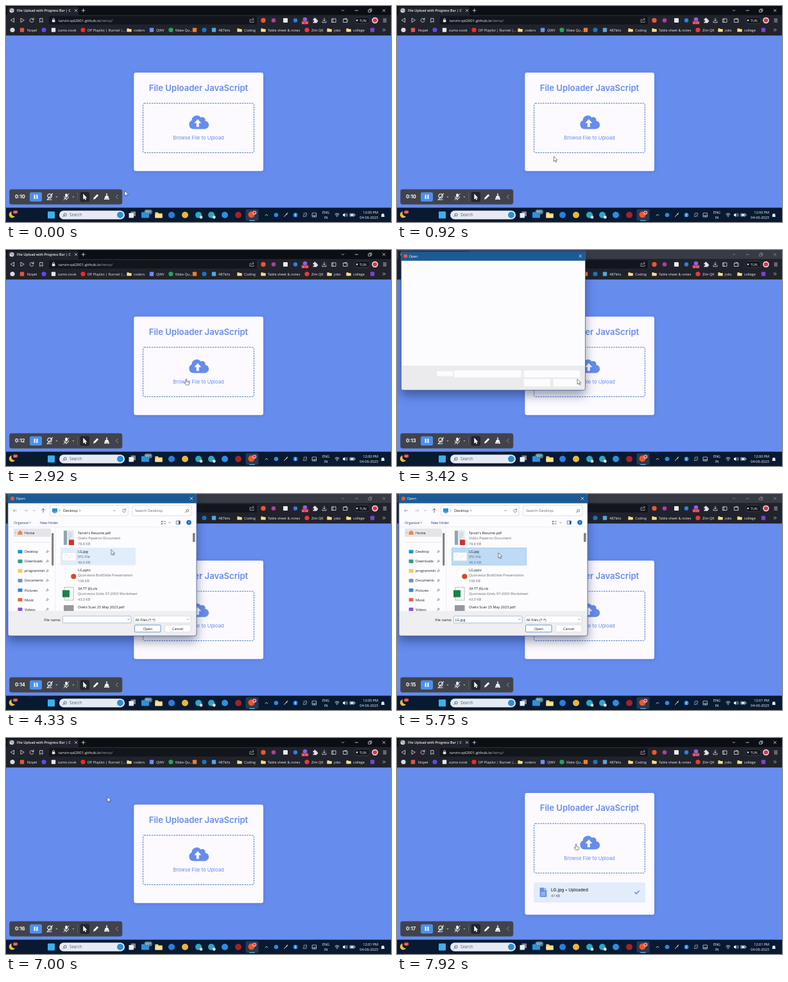
Write an HTML page that moves like this. It is 600 px wide and 338 px high and loops after 8000 ms.

```html
<!DOCTYPE html>
<html lang="en">
<head>
<meta charset="utf-8">
<title>File uploader</title>
<style>
  html, body { margin: 0; width: 100%; height: 100%; overflow: hidden; background: #668cee; }
  svg { display: block; width: 100vw; height: 100vh; font-family: "Open Sans", "Noto Sans", sans-serif; }
  .page text { font-family: Inter, sans-serif; }
  .dialog { filter: drop-shadow(0 8px 8px rgba(10, 22, 60, .42)); }
  .card { filter: drop-shadow(0 1px 3px rgba(40, 60, 140, .22)); }
</style>
</head>
<body>
<svg id="stage" viewBox="0 0 600 338" preserveAspectRatio="none"></svg>
<script>
const LOOP = 8000, STEP = 1000 / 12;
const BLUE = '#668cee', INK = '#1a1a1e', GREY = '#66666e', LIGHT = '#e4e5ea';

// Markup helpers
const rect = (x, y, w, h, fill, r = 0, more = '') =>
  `<rect x="${x}" y="${y}" width="${w}" height="${h}" rx="${r}" fill="${fill}" ${more}/>`;
const dot = (x, y, r, fill, more = '') => `<circle cx="${x}" cy="${y}" r="${r}" fill="${fill}" ${more}/>`;
const text = (x, y, s, size, fill, more = '') =>
  `<text x="${x}" y="${y}" font-size="${size}" fill="${fill}" ${more}>${s.replace(/&/g, '&amp;')}</text>`;
const line = (d, color = LIGHT, w = .8, more = '') =>
  `<path d="${d}" fill="none" stroke="${color}" stroke-width="${w}" stroke-linecap="round" stroke-linejoin="round" ${more}/>`;
const shape = (d, fill, more = '') => `<path d="${d}" fill="${fill}" ${more}/>`;
const group = (x, y, body, more = '') => `<g transform="translate(${x} ${y})" ${more}>${body}</g>`;
const MID = 'text-anchor="middle"', END = 'text-anchor="end"', BOLD = 'font-weight="600"';
const folder = (x, y, k = 1) =>
  `<g transform="translate(${x} ${y}) scale(${k})">${shape('M-3.5-2.6h2.6l1 1h3.4v4.4h-7z', '#f6cf68')}${rect(-3.5, -.8, 7, 3.6, '#ffdf8b', .4)}</g>`;
const chevron = (x, y, color, s = 1.4) => line(`M${x - s} ${y - s / 2}l${s} ${s} ${s}-${s}`, color, .7);
const cross = (x, y, s, color) => line(`M${x - s} ${y - s}l${2 * s} ${2 * s}m0-${2 * s}l-${2 * s} ${2 * s}`, color, .7);

function tabStrip() {
  return `<rect id="strip" width="600" height="15"/>` + rect(2, 1.5, 111, 14, '#20232c', 2.5) +
    dot(9, 7, 3.6, '#d7d9df') + line('M6 6l2.5.5 1 2 2-1.5M8 4.5l2 1', '#5b6069', .8) +
    text(17, 9, 'File Upload with Progress Bar | C', 5.3, '#f1f1f4', BOLD) +
    cross(109, 7, 1.7, LIGHT) + line('M118 7h5m-2.5-2.5v5', LIGHT) +
    `<g id="winButtons">${chevron(525, 7, LIGHT, 1.8)}${line('M544 7h4.5')}` +
    line('M565 6h3.5v3.5h-3.5zM566.4 6v-1.3h3.5v3.5h-1.3', LIGHT, .7) + cross(589, 7, 2, LIGHT) + '</g>';
}

function toolbar() {
  return rect(0, 14, 600, 32.2, '#20232c') + rect(67, 16, 324, 13, '#13151c', 2) +
    line('M12.5 19.5v6l-5-3zM23 19.5v6l5-3z') +
    line('M42.8 21a3 3 0 1 0 .2 2.4M43 18.8v2.5h-2.5M53 19.5h4v6l-2-1.6-2 1.6z') +
    rect(71.8, 21.5, 4.6, 3.8, LIGHT, .5) + line('M72.8 21.5v-1a1.3 1.3 0 0 1 2.6 0v1') +
    `<text x="82" y="24.8" font-size="6" fill="#f4f4f6">tarvin-qd2001.github.io<tspan fill="#9a9da6">/temp/</tspan></text>` +
    line('M382 21h-2v4.5h6v-2M382 23.5q.5-3 4-3m-1.5-1.5l1.7 1.5-1.7 1.6', '#b5b7be', .7) +
    dot(401, 22.5, 3.7, '#f0562b') + rect(392.2, 18, .5, 9, '#3b3e48') + dot(417, 22.5, 3.3, '#b23f9c') +
    rect(432, 19, 7, 7, '#e9edf2', 1) + dot(451, 22.5, 3.2, '#2f7fe4') + dot(466, 21, 3.3, '#8b63d8') +
    rect(460.5, 23.5, 11, 5, '#e02c45', 1) + `<text id="badge" x="466" y="27.6" font-size="4.2" fill="#fff" ${MID}></text>` +
    shape('M478.5 20.3h1.7a1.3 1.3 0 1 1 2.4 0h1.9v2.2a1.2 1.2 0 1 1 0 2.2v1.8h-6v-2a1.2 1.2 0 1 0 0-2z', LIGHT) +
    line('M496 19v4.5m-1.8-1.7l1.8 1.8 1.8-1.8M493 24v1.8h6V24') +
    line('M508 20h6v5.5h-6zM509.4 20v5.5M526 20.5h6v5h-6zM526 20.5l4.5-1v1M530.5 23h.5') +
    rect(543, 17.5, 24, 10, '#14161d', 5, 'stroke="#4a4d57" stroke-width=".6"') + dot(547, 22.5, 1.3, LIGHT) +
    text(551, 24.5, 'TUN', 5.3, '#eee') +
    dot(575, 22.5, 4.8, '#f3e4e5') + dot(575, 22.5, 3.3, '#d6344d') + line('M588 20.3h4.6m-4.6 2.3h4.6m-4.6 2.3h4.6');
}

function bookmarks() {
  const y = 37.5;
  const sites = [
    [10, '#d9dade', ''], [25, '#e05548', 'Nopel', 33], [59, '#5a49ef', ''], [74, '#e7e7ec', 'zumo.nook', 81],
    [120, '#f12a2a', 'DP Playlist | Runnel |...', 127], [227, '#6a8ff2', 'QWV', 234],
    [257, '#27a35a', 'Mate Qu...', 264], [294, '#ee7f2a', ''], [309, '#1f73b9', ''],
    [324, '#58a5dc', '487kits', 331], [469, '#e63b3b', 'Zim QK', 476], [571, '#7a45cf', '']
  ];
  const dirs = [[192, 'coders'], [364, 'Coding'], [401, 'Table sheet & notes'], [504, 'jobs'], [534, 'college']];
  return sites.map(([x, c, s, tx], i) =>
    (i % 2 ? rect(x - 3.2, y - 3.2, 6.4, 6.4, c, 1) : dot(x, y, 3.6, c)) + (s && text(tx, y + 2, s, 5.5, '#f0f0f3'))).join('') +
    dirs.map(([x, s]) => folder(x, y) + text(x + 7, y + 2, s, 5.5, '#f0f0f3')).join('') +
    line('M587.3 35.8l1.6 1.7-1.6 1.7m2.2-3.4l1.6 1.7-1.6 1.7', LIGHT, .7);
}

function page() {
  const form = text(300, 132.6, 'File Uploader JavaScript', 13.1, BLUE, `${MID} ${BOLD}`) +
    rect(213.6, 152.2, 172.8, 77.4, 'none', 2, 'stroke="#4173bd" stroke-width="1" stroke-dasharray="2.4 1.4"') +
    group(285, 170.5, shape('M7 22a7 7 0 0 1-2.4-13.4A7.6 7.6 0 0 1 18.4 4a4.7 4.7 0 0 1 7 5.2A6.2 6.2 0 0 1 24 22z', BLUE) +
      shape('M13.8 6.5l5.5 6.2h-3.5v6h-4v-6H8.3z', '#fcfaff')) +
    text(300, 208.9, 'Browse File to Upload', 7.7, BLUE, MID);
  const row = rect(213, 226, 174, 31.5, '#e3ecfa', 2) +
    shape('M222.6 234.3h6.4v4h4.2v10.4h-10.6zM229.8 234.3l3.4 3.3h-3.4z', BLUE) +
    line('M225 241.5h5.8m-5.8 2.2h5.8m-5.8 2.2h5.8', '#e3ecfa', .8) +
    text(240, 240.4, 'LG.jpg • Uploaded', 6.6, '#26282e', 'font-weight="500"') +
    text(240, 248.5, '47 KB', 5, '#4a4d55') + line('M370.8 241.6l2.2 2.2 4-4.4', BLUE, 1.6);
  return rect(0, 46, 600, 270, BLUE) +
    `<g class="page"><rect id="card" class="card" x="199.3" width="201.7" rx="3" fill="#fcfaff"/>` +
    `<g id="form">${form}</g><g id="row">${row}</g></g>`;
}

function dialog() {
  const head = rect(3, 0, 294, 14.5, '#1d5a94') + dot(10, 7, 3.1, '#f0562b') +
    text(15.5, 9.2, 'Open', 5.6, '#fff') + cross(289, 7, 2, '#fff');
  const field = (x, y, w, h, stroke = '#d3d2d8') => rect(x, y, w, h, '#fff', 1, `stroke="${stroke}" stroke-width=".7"`);
  const nav = line('M16.5 26h-5m2-2l-2 2 2 2', '#8d8d95') + line('M28.5 26h5m-2-2l2 2-2 2', '#b4b4bb') +
    chevron(44, 26, '#8d8d95') + line('M58 29v-6m-2.3 2.3l2.3-2.3 2.3 2.3', '#4b4b53') +
    field(68.5, 18, 121.5, 16) + rect(72, 22.5, 8, 6, '#2292d4', .6) + rect(73.5, 29, 5, .8, '#16669d') +
    line('M83 24.5l1.5 1.5-1.5 1.5M114.5 24.5l1.5 1.5-1.5 1.5', '#55555c', .6) + text(89, 28, 'Desktop', 5.9, INK) +
    chevron(169, 26, '#55555c') + line('M186.3 24.6a2.5 2.5 0 1 0 .3 2.2m0-3.6v1.8h-1.8', '#55555c', .7) +
    field(197, 18, 92, 16) + text(201, 28, 'Search Desktop', 5.9, GREY) +
    line('M281.2 27.2l-1.9 2m1.6-3.2a1.9 1.9 0 1 0 3.8 0 1.9 1.9 0 1 0-3.8 0', '#55555c', .7) +
    text(12, 46.6, 'Organize', 5.5, '#24406e') + chevron(37.5, 44.8, '#24406e', 1.1) + text(53, 46.6, 'New folder', 5.5, '#24406e') +
    rect(242, 42, 2.2, 2, '#5b7fa8') + rect(242, 45.5, 2.2, 2, '#5b7fa8') + line('M246 43h2.6m-2.6 3.5h2.6', '#5b5b64', .7) +
    chevron(255, 44.8, '#55555c', 1.1) + rect(265.3, 42, 6, 5.2, '#fff', .4, 'stroke="#27548d" stroke-width=".7"') +
    rect(269, 42, 2.3, 5.2, '#27548d') + dot(285, 44.6, 3.8, '#176ec1') + text(285, 46.6, '?', 5.5, '#fff', `${MID} ${BOLD}`) +
    rect(3, 51.2, 294, .6, '#e3e2e7');
  const places = [['Desktop', '#2292d4'], ['Downloads', '#2f9c82'], ['programmin', '#f5cb5c'], ['Documents', '#6d91b4'],
    ['Pictures', '#2f86dc'], ['Music', '#dd6a4b'], ['Videos', '#8757c9']];
  const side = rect(12, 54, 58, 13, '#e5e4e9', 1) + shape('M22 56.8l3.6 3.2v3.8h-7.2V60z', '#e58a4a') + text(29, 62.6, 'Home', 5.5, INK) +
    line('M14.5 59.5l1.3 1.2-1.3 1.2', '#66666d', .5) + rect(14, 75.5, 55, .6, '#d9d8de') +
    places.map(([s, c], i) => {
      const y = 90.3 + i * 15.05;
      return rect(18.5, y - 2.8, 7, 5.6, c, 1) + text(29, y + 2, s, 5.4, INK) +
        line(`M64.5 ${y - 2}l2.2 1.8-1 .3-1 1.2-1.6-1.7 1.3-.7zm-.6 2.5l-1.3 1.3`, '#66666d', .6);
    }).join('') + rect(71.2, 61, 3, 51, '#7c7c82', 1.2) + rect(76.6, 52, .5, 131, '#e2e1e6');
  const files = [["Tarvin's Resume.pdf", 'Ovelo Paperon Document', '78.8 KB'], ['LG.jpg', 'JPG File', '46.6 KB'],
    ['LG.pptx', 'Quorvexia BoldSlide Presentation', '108 KB'], ['3A TT (6).xls', 'Quorvexia Grids 97-2003 Worksheet', '43.0 KB'],
    ['Ovelo Scan 25 May 2023.pdf', '', '']];
  const list = '<rect id="hover" x="85" width="117" height="27.4" fill="#e0edfb"/>' +
    '<rect id="picked" x="85.3" y="84.2" width="116.4" height="27" fill="#bedbf5" stroke="#93c2ea" stroke-width=".6"/>' +
    files.map((f, i) => f.map((s, k) => text(112, 62.5 + i * 29 + k * 8.7, s, 5.5, k ? GREY : INK)).join('')).join('') +
    rect(90, 57.5, 15, 22, '#e9edf0', 0, 'stroke="#cacdd3" stroke-width=".4"') + rect(90, 57.5, 5, 22, '#8fa5b5') +
    line('M97 61h6m-6 3h6m-6 3h5m-5 3h3', '#a4a8ae', .7) + rect(98, 71.5, 8, 8.5, '#d92d2a', 1) +
    rect(88, 91.5, 21, 13, '#fff', 0, 'stroke="#d5d8de" stroke-width=".5"') + line('M91 95h5m-5 3h3m5-1h6m-8 3h4', '#d1d5df', .6) +
    rect(93, 118, 14, 17, '#fdfdfe', 0, 'stroke="#e8e8ec" stroke-width=".4"') + dot(105.3, 129, 4.1, '#d24b2c') +
    rect(91, 146, 14, 20, '#fff', 0, 'stroke="#88a793" stroke-width=".7"') + rect(88, 150.5, 11, 11, '#18814a') +
    rect(90, 174, 15.5, 9, '#98979b');
  const foot = rect(3, 183, 294, 39, '#efeef1') + text(85.5, 198.5, 'File name:', 5.5, INK, END) +
    field(88.5, 191, 106.5, 10.8, '#8aa9cb') + '<text id="fileName" x="90.5" y="198.5" font-size="5.5" fill="#1a1a1e"></text>' +
    chevron(191, 196.3, '#55555c', 1.1) + field(199.5, 191, 88.5, 10.8) + text(201.5, 198.5, 'All Files (*.*)', 5.5, INK) +
    chevron(283.5, 196.3, '#55555c', 1.1) + field(200.5, 205, 40.5, 11, '#2774bd') + text(221, 212.5, 'Open', 5.5, INK, MID) +
    field(247.5, 205, 40.5, 11) + text(267.5, 212.5, 'Cancel', 5.5, INK, MID);
  const blank = rect(3, 14, 294, 169, '#fcfbfe') + rect(3, 183, 294, 39, '#ebebed') +
    rect(60, 191.5, 25.5, 8, '#fcfbfe') + rect(87.5, 190.5, 107, 11, '#fcfbfe') +
    rect(199, 190.5, 89.5, 11, '#fcfbfe') + rect(199, 204, 42, 12, '#fcfbfe') + rect(246, 204, 42.5, 12, '#fcfbfe');
  return `<clipPath id="listClip">${rect(78, 52, 212, 131, '#000')}</clipPath><clipPath id="frame">${rect(3, 0, 294, 222, '#000', 3)}</clipPath>` +
    `<g id="dialog" class="dialog"><g clip-path="url(#frame)">${rect(3, 0, 294, 222, '#fcfbfe')}${nav}${side}` +
    `<g clip-path="url(#listClip)">${list}</g>${rect(291, 61, 3.6, 14, '#828288', 1)}${foot}<g id="blank">${blank}</g>${head}</g>` +
    rect(3, -2, 294, 224, 'none', 3, 'stroke="#3d5f93" stroke-width=".8"') + '</g>';
}

function recorder() {
  return rect(5.5, 287, 175.5, 23.3, '#40434b', 3, 'stroke="#4b4f58" stroke-width=".6"') +
    `<text id="timer" x="14" y="301" font-size="7.5" font-weight="700" fill="#fff" font-family="Inter, sans-serif"></text>` +
    rect(37, 291.5, 19, 14.5, '#4c8ff0', 2.5) + rect(43.6, 295.3, 2, 6.8, '#fff', .4) + rect(47.4, 295.3, 2, 6.8, '#fff', .4) +
    line('M64.8 297.2a3.2 3.2 0 1 1 6.4 0 3.2 3.2 0 1 1-6.4 0M65 303h6M64 303.5l8.5-10', '#fff', 1.1) +
    shape('M77.3 298h3.2l-1.6 1.8zM103.3 298h3.2l-1.6 1.8z', '#b7bac2') +
    rect(92.3, 293.5, 3.4, 6, '#fff', 1.7) + line('M90.6 298.5a3.4 3.4 0 0 0 6.8 0M94 302v1.7M90 303.5l8-9.5', '#fff', .9) +
    rect(111.3, 292, .6, 13, '#666a74') + rect(115.5, 291, 14.5, 15.5, '#23262d', 2.5) +
    shape('M120.3 293.8v9l2-1.8 1.4 2.8 1.4-.7-1.4-2.7h2.7z', '#fff') +
    shape('M136 302.8l.7-2.7 5.4-5.6 2.1 2-5.5 5.6z', '#fff') +
    line('M157 293.8v3.5', '#fff', 1.4) + shape('M154.7 297.2h4.6l1.7 5.8h-8z', '#fff') + line('M155.8 300.5v2.5m2.3-2.5v2.5', '#3c4049', .6) +
    line('M174.3 295.5l-2.8 3 2.8 3', '#9b9fa8', .9);
}

function taskbar() {
  const apps = [[258, '#2c7de0'], [279, '#e9b63c'], [300, '#2ba6c4'], [320, '#2ba6c4'], [341, '#2d8fe0'], [362, '#a3222b']];
  return rect(0, 315.6, 600, 22.4, '#081a31') +
    shape('M9 321.5a5 5 0 1 0 5 7.5 5 5 0 0 1-5-7.5z', '#f6b93a') + rect(10.8, 319.8, 7.6, 5.4, '#c8392f', 2.7) +
    text(14.8, 324, '34°', 4.2, '#fff', MID) +
    rect(65, 321.5, 11, 11, '#3cb1ee', .8) + rect(83, 320.3, 102, 13.4, '#e6ebf3', 6.7) +
    line('M90.3 328l-1.8 2m1.5-3.3a2.1 2.1 0 1 0 4.2 0 2.1 2.1 0 1 0-4.2 0', '#3d4552', .8) + text(99, 329.2, 'Search', 6.2, '#5a626e') +
    dot(178, 327, 5, '#2b8fd6') + rect(194.5, 321.5, 7.5, 7.5, '#7f8894', .6) + rect(191.5, 324, 7.5, 7.5, '#eceff3', .6) +
    rect(211, 322.5, 12, 9, '#2b93e0', 1) + rect(215.5, 318.5, 12.5, 7.4, '#4b7f96', 3.7) + text(221.8, 324.2, '99+', 5.2, '#fff', MID) +
    folder(238, 327, 1.6) + apps.map(([x, c]) => dot(x, 327, 5, c)).join('') + dot(304, 330.5, 2.4, '#e4ccb9') + dot(324.3, 330.5, 2.4, '#e8e2d4') +
    rect(373.5, 318, 20, 18, '#26394f', 2) + dot(382.5, 326.5, 5, '#f0562b') + dot(387.3, 323.3, 2.9, '#f3e0e2') + dot(387.3, 323.3, 2, '#d6344d') +
    rect(379, 335, 9, 1.2, '#64b8f2', .6) +
    line('M404 328l2-2 2 2') + dot(421, 327, 3.3, '#2b8bdd') + line('M433.5 329.7l4.7-5.5M437 327l1.5-3', LIGHT, .9) +
    dot(451, 327, 3.5, '#1d7be0') + line('M449.6 325.5l2.7 2.7-1.3 1.4v-5.2l1.3 1.4-2.7 2.7', '#fff', .5) +
    line('M463.5 324.5l5 5m-3.5-5.5h3.5v3.5M463.5 327v2.5h3', '#a9b3c0', .8) + line('M477.5 324h6v6h-6zM477.5 328h6m-3 0v2', LIGHT, .7) +
    text(498.5, 325.2, 'ENG', 5.5, '#fff', MID) + text(498.5, 333.2, 'IN', 5.5, '#fff', MID) +
    line('M512.8 325.8a4.6 4.6 0 0 1 6.4 0M514 327.4a3 3 0 0 1 4 0', '#fff', .8) + dot(516, 329.3, .8, '#fff') +
    shape('M525 325.6h1.4l2-1.7v6.2l-2-1.7H525z', '#fff') + line('M529.8 325.5a2 2 0 0 1 0 3M531 324.3a3.6 3.6 0 0 1 0 5.4', '#fff', .6) +
    line('M536.3 325h6.5v4h-6.5zM544 326.3v1.4', '#fff', .7) + rect(537, 325.7, 4.5, 2.6, '#fff') +
    `<text id="clock" x="580" y="325.2" font-size="5.5" fill="#fff" ${END}></text>` + text(580, 333.2, '04-06-2023', 5.5, '#fff', END) +
    shape('M585 329.3v-2.2a2.3 2.3 0 0 1 4.6 0v2.2l.7.8h-6z', LIGHT);
}

const arrow = shape('M0 0v8.2l1.9-1.8 1.3 2.8 1.2-.5-1.3-2.8h2.7z', '#fff', 'stroke="#222" stroke-width=".55"');
const hand = shape('M-.8.6a.8.8 0 0 1 1.6 0v3.2l3 .7q1 .3.8 1.5l-.7 3.2H-.7L-3 5.8q.5-1 1.4-.2l.8.6z', '#fff', 'stroke="#222" stroke-width=".55"');

const stage = document.getElementById('stage');
stage.innerHTML = page() + tabStrip() + toolbar() + bookmarks() + taskbar() + dialog() + recorder() +
  `<g id="pointer"><g id="arrow">${arrow}</g><g id="hand">${hand}</g></g>`;
const el = {};
stage.querySelectorAll('[id]').forEach(n => el[n.id] = n);
const show = (n, on) => n.setAttribute('display', on ? 'inline' : 'none');
const set = (n, name, v) => n.setAttribute(name, v);

const OPENED = 3320, LOADED = 3560, PICKED = 5000, CLOSED = 6900, DONE = 7400, MINUTE = 5000;
const path = [[250, 185, 289], [1400, 281, 202], [3560, 281, 202], [4250, 164, 87], [4500, 164, 87],
  [4900, 158, 92], [7150, 158, 92], [7800, 279, 166]];
const ease = p => p * p * (3 - 2 * p);

function pointerAt(t) {
  const i = path.findIndex(k => k[0] > t);
  if (i === 0) return path[0].slice(1);
  if (i < 0) return path[path.length - 1].slice(1);
  const [t0, x0, y0] = path[i - 1], [t1, x1, y1] = path[i];
  const p = ease((t - t0) / (t1 - t0));
  return [x0 + (x1 - x0) * p, y0 + (y1 - y0) * p];
}

function draw(t) {
  const open = t >= OPENED && t < CLOSED, done = t >= DONE;
  const [x, y] = pointerAt(t);
  const time = '0:' + (10 + Math.max(0, Math.floor((t - 60) / 1000)));
  el.timer.textContent = el.badge.textContent = time;
  el.clock.textContent = t < MINUTE ? '12:00 PM' : '12:01 PM';

  const lift = done ? 18.3 : 0;
  set(el.card, 'y', 104.2 - lift);
  set(el.card, 'height', done ? 190.5 : 154);
  set(el.form, 'transform', `translate(0 ${-lift})`);
  show(el.row, done);

  // The browser window loses focus while the dialog is open
  show(el.dialog, open);
  set(el.strip, 'fill', open ? '#393b44' : '#0c0e15');
  set(el.winButtons, 'opacity', open ? .5 : 1);
  const grow = Math.min(1, .952 + .024 * Math.floor((t - OPENED) / STEP));
  set(el.dialog, 'transform', `translate(150 111) scale(${grow}) translate(-150 -111)`);
  set(el.dialog, 'opacity', grow < .97 ? .6 : 1);
  show(el.blank, t < LOADED);
  const over = Math.floor((y - 55) / 29);
  show(el.hover, x > 85 && x < 202 && over >= 0 && over < 4);
  set(el.hover, 'y', 55 + over * 29);
  show(el.picked, t >= PICKED);
  el.fileName.textContent = t >= PICKED ? 'LG.jpg' : '';

  const link = !open && x > 213 && x < 387 && y > 152 - lift && y < 230 - lift;
  set(el.pointer, 'transform', `translate(${x.toFixed(2)} ${y.toFixed(2)})`);
  show(el.arrow, !link);
  show(el.hand, link);
}

function tick() {
  const t = performance.now() % LOOP;
  draw(Math.floor((t + 4) / STEP) * STEP);
  requestAnimationFrame(tick);
}
tick();
</script>
</body>
</html>
```
